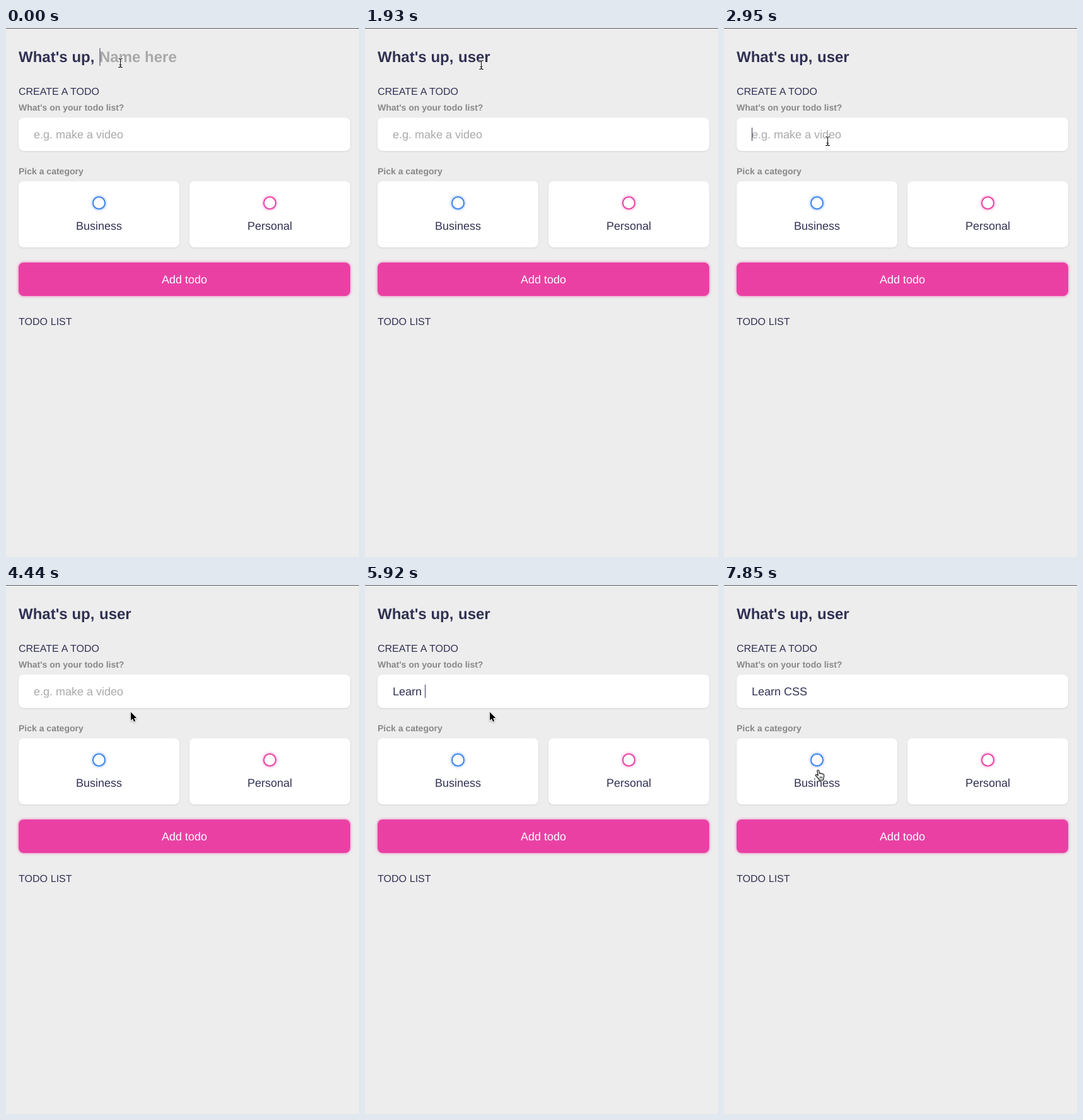
Recreate the animation shown at these times as an HTML page. Size 560 px wide and 839 px high, loop 8 s.

```html
<!DOCTYPE html>
<html lang="en">
<head>
<meta charset="utf-8">
<title>Todo app</title>
<style>
  :root { --blue: #3a82ee; --pink: #ea40a4; --dark: #313154; --grey: #888; }
  html, body { margin: 0; width: 100%; height: 100%; overflow: hidden; background: #ededed; }
  #stage { position: absolute; left: 0; top: 0; width: 560px; height: 839px; overflow: hidden; border-top: 1px solid #555; box-sizing: border-box; }
  .box { position: absolute; box-sizing: border-box; border-radius: 8px; background: #fff; box-shadow: 0 1px 3px rgba(0, 0, 0, .1); }
  .field { left: 20px; top: 141px; width: 526px; height: 53px; }
  .card { top: 242px; width: 255px; height: 105px; }
  .add { left: 20px; top: 371px; width: 526px; height: 53px; background: var(--pink); box-shadow: 0 0 4px rgba(234, 64, 164, .75); }
  .ring { position: absolute; left: 117px; top: 23.5px; width: 21px; height: 21px; box-sizing: border-box; border: 2px solid; border-radius: 50%; }
  .blue { border-color: var(--blue); box-shadow: 0 0 4px rgba(58, 130, 238, .75); }
  .pink { border-color: var(--pink); box-shadow: 0 0 4px rgba(234, 64, 164, .75); }
  svg { position: absolute; left: 0; top: 0; }
  text { font: 18px "Liberation Sans", Arial, sans-serif; fill: var(--dark); text-rendering: geometricPrecision; }
  .title { font-size: 24px; font-weight: 700; }
  .head { font-size: 16px; word-spacing: .4px; }
  .label { font-size: 14px; font-weight: 700; fill: var(--grey); }
  .mid { text-anchor: middle; }
  .hint { fill: #a9a9a9; }
  .caret { fill: var(--dark); }
  .cursor { filter: drop-shadow(0 1px 1px rgba(0, 0, 0, .3)); }
  #beam { fill: none; stroke-linecap: round; }
</style>
</head>
<body>
<div id="stage">
  <div class="box field"></div>
  <div class="box card" style="left:20px"><div class="ring blue"></div></div>
  <div class="box card" style="left:291px"><div class="ring pink"></div></div>
  <div class="box add"></div>
</div>
<svg width="560" height="839" viewBox="0 0 560 839">
  <text class="title" x="20" y="54">What's up,</text>
  <text class="title" id="name" x="148" y="54"></text>
  <text class="head" x="20" y="106">CREATE A TODO</text>
  <text class="label" x="20" y="131">What's on your todo list?</text>
  <text id="todo" x="44" y="175"></text>
  <text class="label" x="20" y="232">Pick a category</text>
  <text class="mid" x="147.5" y="320">Business</text>
  <text class="mid" x="418.5" y="320">Personal</text>
  <text class="mid" x="283" y="405" style="fill:#fff">Add todo</text>
  <text class="head" x="20" y="471">TODO LIST</text>
  <rect class="caret" id="nameCaret" y="32" width="1" height="28"/>
  <rect class="caret" id="todoCaret" y="158" width="1" height="21"/>

  <g id="beam">
    <path id="beamLine" d="M-3 -7Q0 -7 0 -5Q0 -7 3 -7M0 -5V5M-3 7Q0 7 0 5Q0 7 3 7M-1.5 3H1.5" stroke="#fff" stroke-width="2.6" opacity=".85"/>
    <path d="M-3 -7Q0 -7 0 -5Q0 -7 3 -7M0 -5V5M-3 7Q0 7 0 5Q0 7 3 7M-1.5 3H1.5" stroke="#111" stroke-width="1.1"/>
  </g>
  <g id="arrow" class="cursor">
    <path d="M0 0V13.2L3 10.4L5 15.2L7.2 14.2L5.2 9.6H9.4Z" fill="#000" stroke="#fff" stroke-width="2" stroke-linejoin="round" paint-order="stroke"/>
  </g>
  <g id="hand" class="cursor">
    <path d="M3.5 1.8C3.3 .3 5.6 0 6 1.7L6.9 6C7.2 5 8.8 5.1 9.1 6.4C9.6 5.6 11.2 5.8 11.5 7C12 6.3 13.7 6.5 14 8.1C14.4 10.5 14 12 13 14L12.8 16.3H6.6L6 14.6C4.5 13 3 11 1.2 9.5C.2 8.4 1.6 7.1 3 7.9L4.8 9.3Z" fill="#fff" stroke="#111" stroke-width="1.1" stroke-linejoin="round"/>
    <path d="M7.6 10.5V14M9.4 10.5V14M11.2 10.5V14" stroke="#111" stroke-width=".8"/>
  </g>
</svg>
<script>
const LOOP = 8000;
const $ = id => document.getElementById(id);

// [time, typed text, caret shown]
const nameSteps = [
  [0, '', 1], [300, '', 0], [590, 'u', 1], [1190, 'us', 1], [1335, 'use', 1],
  [1480, 'user', 1], [1930, 'user', 0], [2520, 'user', 1], [2950, 'user', 0]
];
const todoSteps = [
  [0, '', 0], [2950, '', 1], [3400, '', 0], [4000, '', 1], [4440, '', 0],
  [4890, 'L', 1], [5190, 'Le', 1], [5340, 'Lea', 1], [5480, 'Lear', 1], [5630, 'Learn', 1],
  [5920, 'Learn ', 1], [6220, 'Learn C', 1], [6370, 'Learn CS', 1], [6820, 'Learn CS', 0],
  [7120, 'Learn CSS', 1], [7560, 'Learn CSS', 0]
];
// [time, shape, x, y]
const cursorSteps = [
  [0, 'beam', 181.5, 55.5], [150, 'beam', 183.5, 57], [300, 'beam', 184.5, 58.5],
  [2080, 'arrow', 182, 105], [2220, 'beam', 178.5, 165], [2370, 'arrow', 172, 199],
  [2520, 'beam', 166.5, 184], [2660, 'beam', 164.5, 179.5],
  [3250, 'arrow', 190, 197], [3400, 'arrow', 198, 201.5],
  [7560, 'arrow', 200, 226], [7700, 'hand', 160, 333], [7850, 'hand', 144.5, 293]
];

const pen = document.createElement('canvas').getContext('2d');
const widthOf = (text, font) => {
  pen.font = font + ' "Liberation Sans", Arial, sans-serif';
  return pen.measureText(text).width;
};
const stepAt = (steps, t) => steps.findLast(s => s[0] <= t);

function showInput(id, [, text, caret], hint, caretX) {
  const el = $(id);
  el.textContent = text || hint;
  el.classList.toggle('hint', !text);
  const bar = $(id + 'Caret');
  bar.setAttribute('x', caretX(text));
  bar.style.visibility = caret ? 'visible' : 'hidden';
}

function draw(t) {
  showInput('name', stepAt(nameSteps, t), 'Name here', s => 148.5 + widthOf(s, '700 24px'));
  showInput('todo', stepAt(todoSteps, t), 'e.g. make a video', s => Math.floor(44 + widthOf(s, '18px')));
  const [, shape, x, y] = stepAt(cursorSteps, t);
  for (const id of ['beam', 'arrow', 'hand']) {
    $(id).style.display = id === shape ? '' : 'none';
  }
  $(shape).setAttribute('transform', `translate(${x} ${y})`);
}

function tick() {
  draw(performance.now() % LOOP);
  requestAnimationFrame(tick);
}
tick();
</script>
</body>
</html>
```
